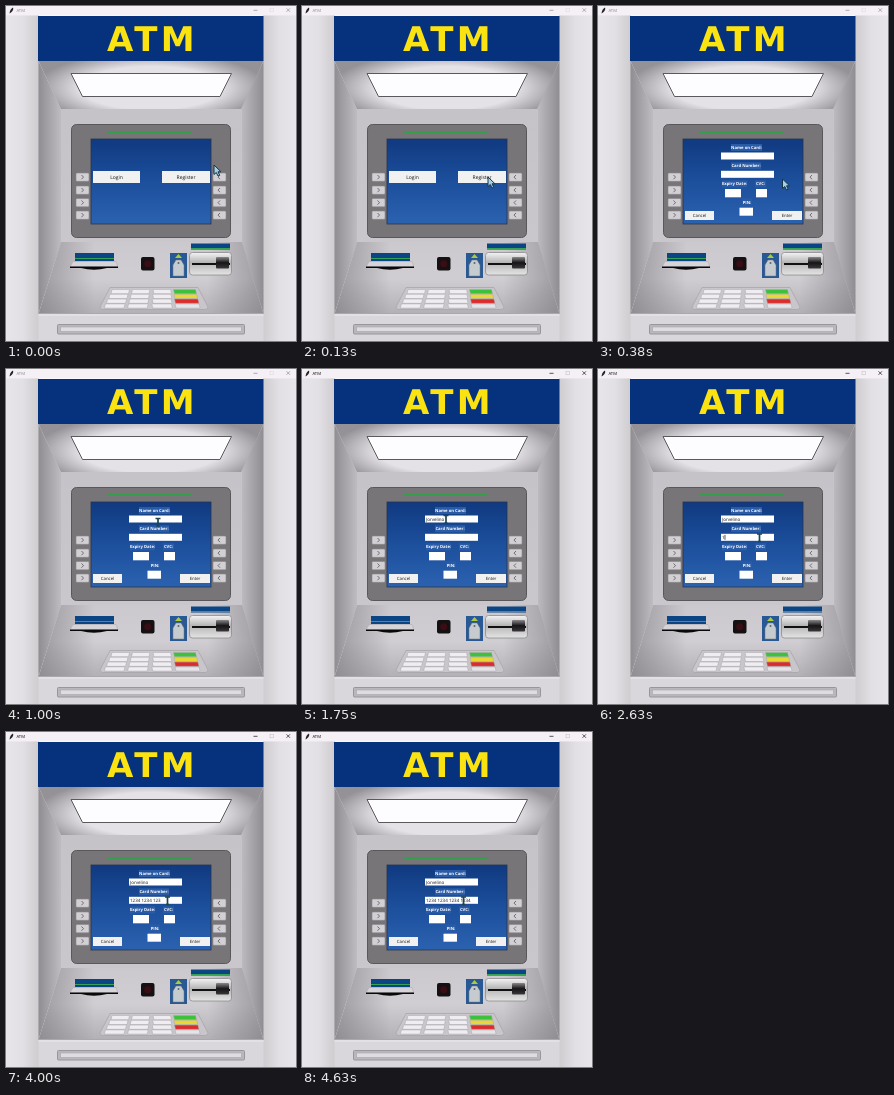
Animation, 290 px wide and 335 px high, one loop 5010 ms. Source, as an HTML page:

```html
<!DOCTYPE html>
<html lang="en">
<head>
<meta charset="utf-8">
<title>ATM</title>
<style>
html, body { margin: 0; width: 100%; height: 100%; overflow: hidden; background: #fff; }
svg { display: block; width: 290px; height: 335px; }
text { font-family: "Open Sans", "Noto Sans", sans-serif; text-rendering: geometricPrecision; }
.brand { font: bold 34px "DejaVu Sans", sans-serif; letter-spacing: 3.5px; fill: #fbe312; }
.label { font-size: 4.2px; font-weight: 700; fill: #fff; text-anchor: middle; }
.button { fill: #111; text-anchor: middle; }
.entry { font-size: 4.5px; fill: #111; }
</style>
</head>
<body>
<svg viewBox="0 0 290 335">
  <defs>
    <linearGradient id="side"><stop stop-color="#e7e5e9"/><stop offset=".5" stop-color="#e2e0e4"/><stop offset="1" stop-color="#cecccf"/></linearGradient>
    <radialGradient id="ceiling" gradientUnits="userSpaceOnUse" cx="0" cy="0" r="1" gradientTransform="translate(145 82) scale(116 36)">
      <stop offset=".6" stop-color="#e4e2e6"/><stop offset="1" stop-color="#949296"/>
    </radialGradient>
    <linearGradient id="wall"><stop stop-color="#8f8d91"/><stop offset="1" stop-color="#bebcc0"/></linearGradient>
    <linearGradient id="back" x2="0" y2="1"><stop stop-color="#c5c3c7"/><stop offset="1" stop-color="#c9c7cb"/></linearGradient>
    <linearGradient id="shelf" x2="0" y2="1"><stop stop-color="#cbc9cd"/><stop offset=".5" stop-color="#d0ced2"/><stop offset="1" stop-color="#b2b0b4"/></linearGradient>
    <linearGradient id="shelfShade"><stop stop-color="#77757a" stop-opacity=".6"/><stop offset=".25" stop-color="#77757a" stop-opacity="0"/><stop offset=".75" stop-color="#77757a" stop-opacity="0"/><stop offset="1" stop-color="#77757a" stop-opacity=".6"/></linearGradient>
    <linearGradient id="screen" x2="0" y2="1"><stop stop-color="#103a80"/><stop offset=".5" stop-color="#1c4f9c"/><stop offset="1" stop-color="#2b62b0"/></linearGradient>
    <linearGradient id="metal" x2="0" y2="1"><stop stop-color="#f4f4f4"/><stop offset=".45" stop-color="#b5b5b6"/><stop offset="1" stop-color="#e4e4e4"/></linearGradient>
    <linearGradient id="cardMouth" x2="0" y2="1"><stop stop-color="#8a888b"/><stop offset=".5" stop-color="#161416"/><stop offset="1" stop-color="#3a383b"/></linearGradient>
  </defs>

  <g id="machine">
    <rect y="9" width="33" height="326" fill="url(#side)"/>
    <rect y="9" width="33" height="326" fill="url(#side)" transform="translate(290 0) scale(-1 1)"/>
    <path d="M32.500 55H257.500L236 104H55Z" fill="url(#ceiling)"/>
    <path id="leftWall" d="M32.500 55L55 103V237L32.500 308Z" fill="url(#wall)"/>
    <use href="#leftWall" transform="translate(290 0) scale(-1 1)"/>
    <path d="M55 103H236V237H55Z" fill="url(#back)"/>
    <path d="M55 236H236L257.500 308H32.500Z" fill="url(#shelf)"/>
    <path d="M55 236H236L257.500 308H32.500Z" fill="url(#shelfShade)"/>
    <rect x="32" y="10" width="225.500" height="45" fill="#05317d"/>
    <text class="brand" x="101" y="44.500">ATM</text>
    <path d="M65 67.500H225.500L214 90.500H76.500Z" fill="#fdfcfe" stroke="#5b595d"/>

    <rect x="32.500" y="308" width="225" height="27" fill="#d9d7db"/>
    <path d="M32.500 307.500H257.500" stroke="#aaa8ac"/>
    <path d="M32.500 309H257.500" stroke="#ebe9ed"/>
    <rect x="51.500" y="318.500" width="187" height="9.500" rx="1" fill="#b9b7bb" stroke="#98969a"/>
    <rect x="54.500" y="321" width="181" height="4.500" fill="#dedce0" stroke="#a8a6aa" stroke-width=".6"/>

    <rect x="65.500" y="118.500" width="159" height="113" rx="5" fill="#777578" stroke="#59575a"/>
    <path d="M101 126H186" stroke="#20ad3c" stroke-width="1.300"/>
    <rect x="85" y="133" width="120" height="85" fill="url(#screen)" stroke="#26344f" stroke-width=".8"/>
    <g id="sideKeys"></g>

    <path d="M69 247H108V255H69Z" fill="#0b4584"/>
    <path d="M69 252.500H108" stroke="#35a153"/>
    <path d="M67 255.500H110L112 261H64Z" fill="#d6d4d8" stroke="#a6a4a8" stroke-width=".5"/>
    <path d="M64 260.500H112V262H101Q88 265.500 75 262H64Z" fill="#080808"/>
    <rect x="135" y="251" width="13.500" height="13.500" rx="2" fill="#151112"/>
    <circle cx="141.700" cy="257.700" r="3.500" fill="#3a0d15"/>

    <rect x="164" y="247" width="17" height="25" fill="#285994"/>
    <path d="M172.500 248L176 252H169Z" fill="#a9cb3c"/>
    <path d="M167 270V259L170 254H175L178 259V270Z" fill="#c6cbd0" stroke="#70757b" stroke-width=".5"/>
    <circle cx="172.500" cy="257" r="1" fill="#596573"/>

    <path d="M185 237.500H224V243.500H185Z" fill="#0b4584"/>
    <path d="M185 242.500H224" stroke="#35a153"/>
    <rect x="183.500" y="246.500" width="42" height="22.500" rx="3" fill="url(#metal)" stroke="#8d8b8e" stroke-width=".8"/>
    <path d="M186 258H224" stroke="#111" stroke-width="1.800"/>
    <rect x="210" y="251" width="13" height="11.500" rx="1" fill="url(#cardMouth)"/>

    <path d="M104 281.500H192L202 301Q202 303.500 199 303.500H97Q94 303.500 94 301Z" fill="#c8c6ca" stroke="#a09ea2" stroke-width=".6"/>
    <g id="keypad"></g>
  </g>

  <g id="menu"></g>
  <g id="form"></g>

  <g id="blank">
    <rect width="290" height="335" fill="#d2d2d4"/>
    <path d="M0 1H290" stroke="#777"/>
    <rect x="1.500" y="2.500" width="286.500" height="331.500" rx="2" fill="#fefdff" stroke="#79777b"/>
  </g>

  <g id="titleBar">
    <rect id="titleFill" width="290" height="9.500" fill="#f4f0f5"/>
    <path d="M3.500 7.500Q4 3 7 1.500Q8 4 5 6.500L3.500 7.500Z" fill="#222"/>
    <g id="titleInk">
      <text x="10.500" y="6" font-size="4.200">ATM</text>
      <path d="M247.500 4.300H251.500M280.500 2.300L284 5.800M284 2.300L280.500 5.800" stroke="#111" stroke-width=".7"/>
      <rect x="264" y="2.300" width="3.500" height="3.500" fill="none" stroke="#bbb" stroke-width=".5"/>
    </g>
  </g>

  <path id="arrow" d="M0 0V9.500L2.300 7.500L4 11L5.700 10.200L4 6.800H7Z" fill="#a9cfe2" stroke="#17364b"/>
  <path id="beam" d="M-2.500 -3.500H2.500M0 -3.500V4M-1.500 4H1.500" stroke="#1b4650" stroke-width="1.700" fill="none"/>
</svg>
<script>
const byId = id => document.getElementById(id);
const box = (x, y, w, h, fill) => `<rect x="${x}" y="${y}" width="${w}" height="${h}" fill="${fill}"/>`;
const label = (x, y, text, w) =>
  box(x - w / 2, y - 5, w, 7, '#2a5ba6') + `<text class="label" x="${x}" y="${y}">${text}</text>`;
const button = (x, y, w, h, size, text) =>
  box(x, y, w, h, '#f1f1f2') +
  `<text class="button" x="${x + w / 2}" y="${y + h / 2 + size * .36}" font-size="${size}">${text}</text>`;
const entry = (x, y, w, h) => box(x, y, w, h, '#fff');

byId('menu').innerHTML = button(87, 165, 47, 12, 5, 'Login') + button(156, 165, 48, 12, 5, 'Register');
byId('form').innerHTML =
  label(148.5, 143, 'Name on Card:', 31) + entry(123, 146.5, 53, 7) +
  label(148, 161.3, 'Card Number:', 30) + entry(123, 164.8, 53, 7) +
  label(136.5, 179.3, 'Expiry Date:', 25) + label(162.5, 179.3, 'CVC:', 11) +
  entry(127, 183, 16, 8.3) + entry(158, 183, 11, 8.3) +
  label(149, 197.5, 'PIN:', 10) + entry(141.5, 201.7, 13.5, 8) +
  button(87, 205, 29, 9, 4.3, 'Cancel') + button(174, 205, 30, 9, 4.3, 'Enter') +
  '<text id="holder" class="entry" x="124" y="151.7"/><text id="number" class="entry" x="124" y="170"/>' +
  '<path id="caret" stroke="#111" stroke-width=".7"/>';

byId('sideKeys').innerHTML = [167, 180, 192.5, 205].map(y => [70, 207].map((x, side) =>
  `<rect x="${x}" y="${y}" width="13" height="8.3" rx="1" fill="#d2d0d4" stroke="#8a888b" stroke-width=".6"/>
   <path d="M${x + (side ? 7 : 5.5)} ${y + 2}l${side ? -2 : 2} 2.1l${side ? 2 : -2} 2.1" fill="none" stroke="#555" stroke-width=".8"/>`
).join('')).join('');

// Rows widen toward the front edge of the pad.
let keys = '';
['#3cc23a', '#e8d834', '#dc2b2b', '#e6e4e8'].forEach((accent, row) => {
  const y = 283.5 + row * 4.8;
  for (let col = 0; col < 4; col++) {
    const x = 106 - row * 2.2 + col * (20.5 + row * .9);
    const w = (col === 3 ? 22 : 17.5) + row * .7;
    const fill = col === 3 ? accent : '#efedf1';
    keys += `<path d="M${x} ${y}h${w}l${col > 1 ? 1 : -1} 4.2h${-w}z" fill="${fill}" stroke="#a9a7ab" stroke-width=".5"/>`;
  }
});
byId('keypad').innerHTML = keys;

const LOOP = 5010;
const HOLDER = 'Jorvelino';
const NUMBER = '1234 1234 1234 1234';
const pointerSteps = [
  [0, 208, 159], [130, 186, 171], [250, 184.5, 172], [380, 184.5, 173],
  [500, 184, 172], [630, 181, 169], [750, 174, 164], [880, 164, 158],
  [1000, 152, 153], [1130, 144, 150], [2000, 148, 154], [2130, 155, 161],
  [2250, 160, 167], [2380, 161.5, 168.5]
];
const holderSteps = [[0, 0], [1380, 3], [1500, 5], [1630, 7], [1750, 9]];
const numberSteps = [
  [0, 0], [2630, 1], [2750, 2], [2880, 3], [3000, 4], [3130, 6], [3250, 7], [3380, 8],
  [3500, 9], [3630, 10], [3880, 12], [4000, 13], [4130, 15], [4250, 17], [4380, 19]
];
const stepAt = (steps, t) => steps.findLast(step => step[0] <= t);
const show = (id, visible) => byId(id).setAttribute('visibility', visible ? 'visible' : 'hidden');

function draw(t) {
  const opening = t >= 250 && t < 380;
  const active = t >= 1130;
  show('menu', t < 250);
  show('form', t >= 380);
  show('blank', opening);
  show('titleFill', !opening);
  byId('titleBar').setAttribute('transform', opening ? 'translate(3 3) scale(.98)' : '');
  byId('titleInk').setAttribute('opacity', active ? 1 : .45);

  byId('holder').textContent = HOLDER.slice(0, stepAt(holderSteps, t)[1]);
  byId('number').textContent = NUMBER.slice(0, stepAt(numberSteps, t)[1]);
  const onNumber = t >= 2500;
  const field = byId(onNumber ? 'number' : 'holder');
  const caretX = 124.4 + field.getComputedTextLength();
  byId('caret').setAttribute('d', `M${caretX} ${onNumber ? 165.8 : 147.5}v5`);
  show('caret', (t >= 1130 && t < 1380) || (t >= 2500 && t < 2750));

  const [, x, y] = stepAt(pointerSteps, t);
  const overEntry = t >= 380 && x > 123 && x < 176 && ((y > 146 && y < 154) || (y > 164.5 && y < 172));
  for (const id of ['arrow', 'beam']) byId(id).setAttribute('transform', `translate(${x} ${y})`);
  show('arrow', !overEntry);
  show('beam', overEntry);
}

function tick() {
  draw(performance.now() % LOOP);
  requestAnimationFrame(tick);
}
tick();
</script>
</body>
</html>
```
